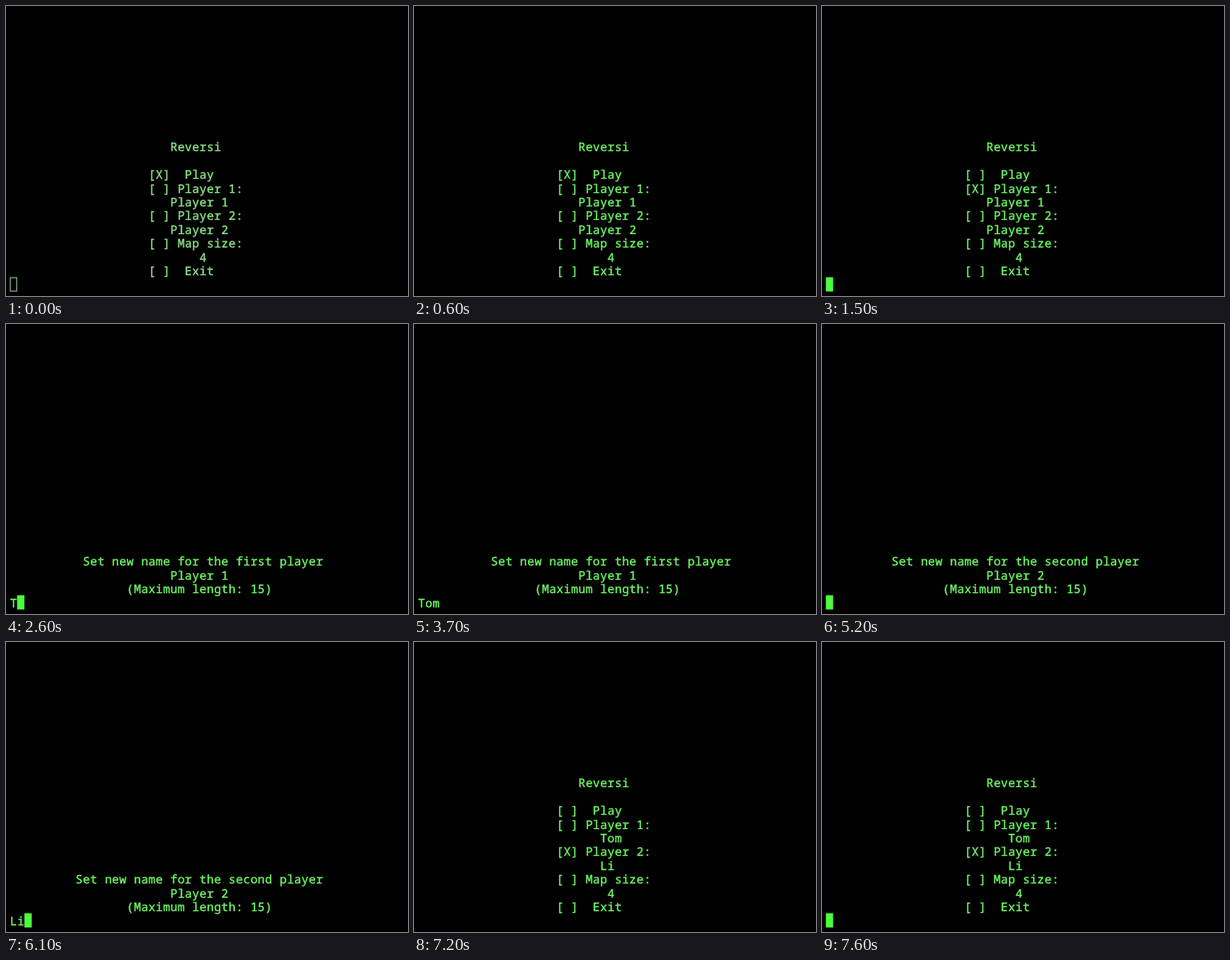
These frames come from a looping animation (480x346 px, 8 s). An HTML page:

```html
<!DOCTYPE html>
<html lang="en">
<head>
<meta charset="utf-8">
<title>Reversi menu</title>
<style>
  html, body { margin: 0; width: 100%; height: 100%; overflow: hidden; background: #000; }
  svg { display: block; width: 480px; height: 346px; color: #70fb66; }
  svg.unfocused { color: #8ee88a; }
  text {
    font: 14px "Noto Sans Mono", "DejaVu Sans Mono", monospace;
    letter-spacing: 0.3px;
    fill: currentColor;
    stroke: currentColor;
    stroke-width: 0.35px;
    white-space: pre;
    text-rendering: geometricPrecision;
  }
  #cursor { fill: #4cff3c; }
  .unfocused #cursor { fill: none; stroke: #a4d4a0; }
</style>
</head>
<body>
<svg id="terminal" viewBox="0 0 480 346">
  <g id="lines"></g>
  <rect id="cursor"/>
</svg>
<script>
const LOOP = 8000, LEFT = 4.6, CELL = 8.7, BASE = 173.3, ROW = 16.42;
const terminal = document.getElementById('terminal');
const lines = document.getElementById('lines');
const cursor = document.getElementById('cursor');

// A screen is a list of [row, column, text].
function menu(selected, first, second) {
  const box = i => i === selected ? '[X]' : '[ ]';
  return [
    [0, 22, 'Reversi'],
    [2, 19, box(0) + '  Play'],
    [3, 19, box(1) + ' Player 1:'],
    [4, ...first],
    [5, 19, box(2) + ' Player 2:'],
    [6, ...second],
    [7, 19, box(3) + ' Map size:'],
    [8, 26, '4'],
    [9, 19, box(4) + '  Exit']
  ];
}

function prompt(column, which, name) {
  return [
    [7, column, `Set new name for the ${which} player`],
    [8, 22, name],
    [9, 16, '(Maximum length: 15)']
  ];
}

const P1 = [22, 'Player 1'], P2 = [22, 'Player 2'], TOM = [25, 'Tom'], LI = [25, 'Li'];

const screens = [
  [0, menu(0, P1, P2)],
  [1200, menu(1, P1, P2)],
  [1800, prompt(10, 'first', 'Player 1')],
  [3900, menu(1, TOM, P2)],
  [4300, menu(2, TOM, P2)],
  [5000, prompt(9, 'second', 'Player 2')],
  [6900, menu(2, TOM, LI)]
];
const typing = [
  [0, ''], [2600, 'T'], [2800, 'To'], [3000, 'Tom'], [3900, ''],
  [6000, 'L'], [6100, 'Li'], [6900, '']
];
const blink = [
  [0, 'hollow'], [100, 'on'], [600, 'off'], [1200, 'on'], [2000, 'off'], [2600, 'on'],
  [3700, 'off'], [4300, 'on'], [5700, 'off'], [6000, 'on'], [6700, 'off'], [7300, 'on']
];

const at = (track, t) => track.findLast(step => step[0] <= t)[1];

function setAll(node, attributes) {
  for (const name in attributes) node.setAttribute(name, attributes[name]);
  return node;
}

function drawLines(list) {
  lines.replaceChildren(...list.map(([row, column, string]) => {
    const text = document.createElementNS('http://www.w3.org/2000/svg', 'text');
    text.textContent = string;
    return setAll(text, { x: LEFT + column * CELL + 0.2, y: BASE + row * ROW });
  }));
}

function drawCursor(column, mode) {
  const inset = mode === 'hollow' ? 0.5 : 0;
  setAll(cursor, {
    x: LEFT + column * CELL + inset,
    y: 323.6 + inset,
    width: CELL - 2 * inset,
    height: 17 - 2 * inset,
    visibility: mode === 'off' ? 'hidden' : 'visible'
  });
}

let shown = '';
function frame() {
  const t = performance.now() % LOOP;
  const screen = at(screens, t), typed = at(typing, t), mode = at(blink, t);
  const key = screens.findIndex(s => s[1] === screen) + typed + mode;
  if (key !== shown) {
    shown = key;
    terminal.classList.toggle('unfocused', mode === 'hollow');
    drawLines([...screen, [10, 0, typed]]);
    drawCursor(typed.length, mode);
  }
  requestAnimationFrame(frame);
}
frame();
</script>
</body>
</html>
```
